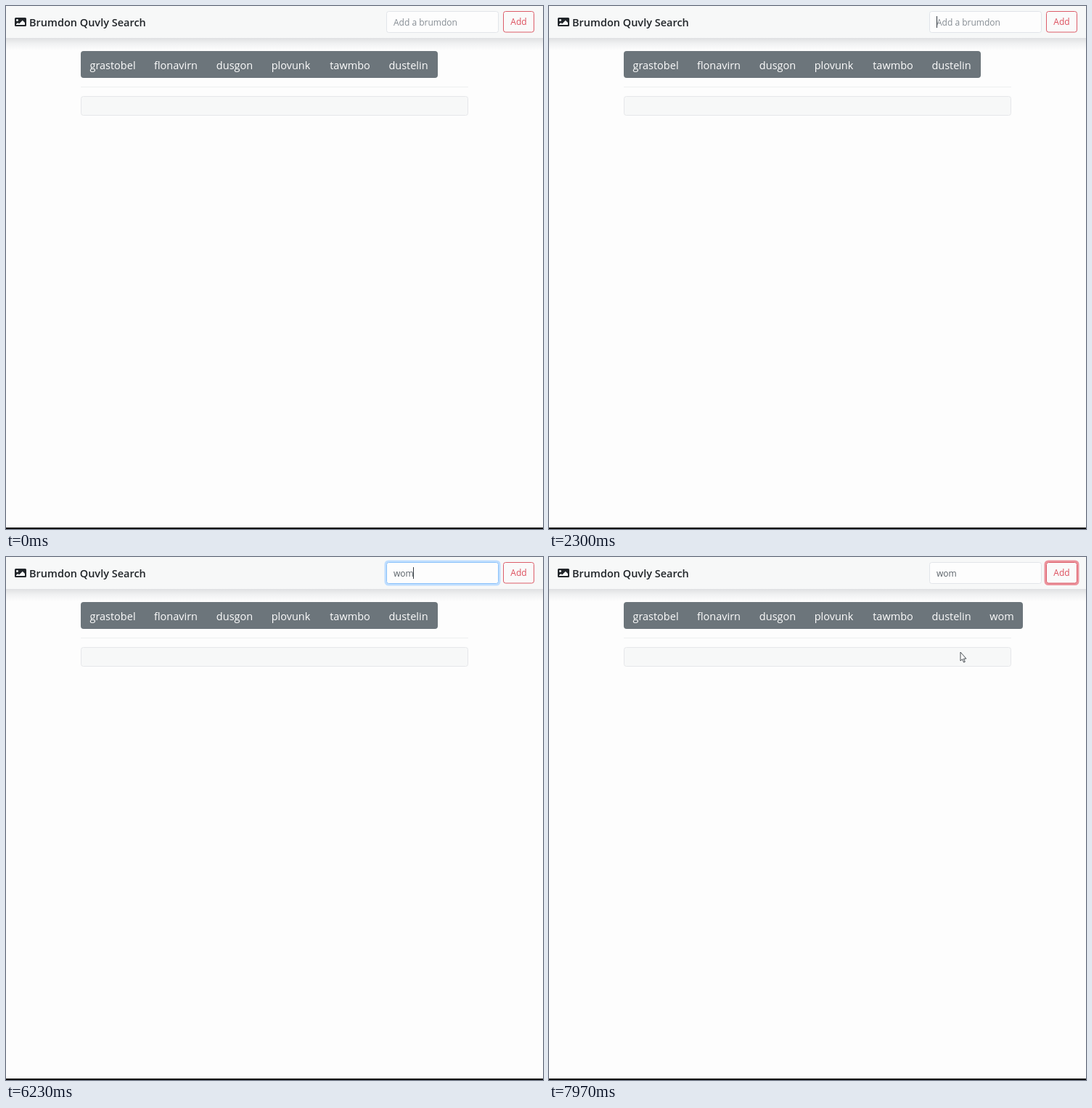
Recreate the animation shown at these times as an HTML page. Size 740 by 720 pixels, loop 8 s.

```html
<!DOCTYPE html>
<html lang="en">
<head>
<meta charset="utf-8">
<title>Search page</title>
<style>
  html, body { margin: 0; width: 100%; height: 100%; overflow: hidden; background: #fdfdfd; }
  svg { display: block; width: 100vw; height: 100vh; }
  text { font-family: "Open Sans", "Noto Sans", sans-serif; }
  .small { font-size: 12px; }
  .tags text { font-size: 14.5px; font-weight: 500; fill: #fdfdfd; text-anchor: middle; }
</style>
</head>
<body>
<svg viewBox="0 0 740 720">
  <defs>
    <linearGradient id="shade" x1="0" y1="0" x2="0" y2="1">
      <stop offset="0" stop-color="#dfe0e2"/>
      <stop offset=".45" stop-color="#f0f1f2"/>
      <stop offset="1" stop-color="#fdfdfd"/>
    </linearGradient>
  </defs>
  <rect width="740" height="720" fill="#fdfdfd"/>
  <rect y="44" width="740" height="17" fill="url(#shade)"/>
  <rect width="740" height="44" fill="#f7f8f8"/>
  <rect y="718" width="740" height="2" fill="#000"/>

  <g fill="#212529">
    <path fill-rule="evenodd" d="M13.5 16h13a1.5 1.5 0 0 1 1.5 1.5v9a1.5 1.5 0 0 1-1.5 1.5h-13a1.5 1.5 0 0 1-1.5-1.5v-9a1.5 1.5 0 0 1 1.5-1.5z
      M15.5 18a1.5 1.5 0 1 0 .01 0z M14 26h12v-3l-3.2-3.2-4.8 4.7-1.6-1.6L14 25z"/>
    <text x="32" y="27.5" font-size="14.5" font-weight="600">Brumdon Quvly Search</text>
  </g>

  <rect id="glow" x="523" y="6" width="157" height="32" rx="4" fill="none" stroke="#bfdeff" stroke-width="3"/>
  <rect id="field" x="524.5" y="7.5" width="154" height="29" rx="3" fill="#fdfdfd"/>
  <text id="entry" class="small" x="534" y="27"></text>
  <rect id="caret" y="14" width="1" height="16" fill="#343a40"/>

  <rect id="ring" x="684" y="6" width="45" height="31.5" rx="4" fill="none" stroke="#ec949d" stroke-width="3"/>
  <rect id="add" x="685.5" y="7.5" width="42" height="28.5" rx="3" stroke="#dc5d69"/>
  <text id="addText" class="small" x="706.5" y="26" text-anchor="middle">Add</text>

  <g class="tags">
    <rect id="bar" x="103" y="62" height="37" rx="4" fill="#6c757b"/>
    <g id="tags"></g>
  </g>
  <path d="M103 111.5H637" stroke="#eeeff0"/>
  <rect x="103.5" y="124.5" width="533" height="26" rx="3" fill="#f7f8f8" stroke="#e6e7ea"/>

  <g id="cursor" stroke="#343a40" stroke-width=".9" stroke-linejoin="round" fill="#fdfdfd">
    <path id="arrow" d="M0 0V12L2.7 9.6 4.5 14 6.3 13.2 4.5 9H8z"/>
    <path id="hand" d="M-1.3 1.2Q0-.8 1.3 1.2V6L3.5 6.2 6 6.8Q8 7.2 8 9V11.5Q8 14 6.5 16H-.5L-4.3 10.5Q-4 8.3-1.3 10z"/>
  </g>
</svg>
<script>
const LOOP = 8000;
const WORD = "wom";
const NAMES = ["grastobel", "flonavirn", "dusgon", "plovunk", "tawmbo", "dustelin", WORD];
const CENTERS = [147, 234, 315, 392.5, 474, 554.5, 624];
const KEYS = [4530, 4670, 4870];
const CARET = [[2270, 2800], [3330, 3870], [4370, 5400], [5930, 6460]];
const CARET_X = [534, 543.5, 551, 561];
const ROUTE = [[6170, 660, 29], [6300, 690, 26], [6400, 720, 22], [6570, 702, 24],
               [7570, 702, 24], [7670, 638, 71], [7970, 567, 131]];

const $ = id => document.getElementById(id);
const set = (id, attrs) => {
  for (const k in attrs) $(id).setAttribute(k, attrs[k]);
};
const show = (id, on) => set(id, { visibility: on ? "visible" : "hidden" });
const ramp = (t, start, length) => Math.min(1, Math.max(0, (t - start) / length));
const ease = p => p * p * (3 - 2 * p);
const fade = (t, start) => ease(ramp(t, start, 150));
const mix = (a, b, p) => `rgb(${a.map((v, i) => Math.round(v + (b[i] - v) * p))})`;

const tags = NAMES.map((name, i) => {
  const el = document.createElementNS("http://www.w3.org/2000/svg", "text");
  el.setAttribute("x", CENTERS[i]);
  el.setAttribute("y", 87);
  el.textContent = name;
  return $("tags").appendChild(el);
});

function pointer(t) {
  const i = ROUTE.findIndex((p, n) => n && t <= p[0]);
  if (i < 0) return ROUTE[ROUTE.length - 1].slice(1);
  const [t0, x0, y0] = ROUTE[i - 1], [t1, x1, y1] = ROUTE[i];
  let p = ramp(t, t0, t1 - t0);
  if (i === ROUTE.length - 1) p = 1 - (1 - p) ** 2;
  return [x0 + (x1 - x0) * p, y0 + (y1 - y0) * p];
}

function draw(t) {
  const focus = fade(t, 2290) - fade(t, 6820);
  const hover = fade(t, 6290) - fade(t, 7595);
  const added = t >= 6900;
  const typed = KEYS.filter(k => t >= k).length;

  set("glow", { opacity: focus });
  set("field", { stroke: mix([226, 229, 233], [140, 194, 250], focus) });
  $("entry").textContent = typed ? WORD.slice(0, typed) : "Add a brumdon";
  set("entry", { fill: typed ? "#5a6168" : "#858c93" });
  set("caret", { x: CARET_X[typed] });
  show("caret", CARET.some(([a, b]) => t >= a && t < b));

  set("ring", { opacity: fade(t, 6820) });
  set("add", { fill: mix([250, 250, 250], [220, 53, 69], hover) });
  set("addText", { fill: mix([221, 78, 92], [253, 250, 250], hover) });

  set("bar", { width: added ? 550 : 492 });
  tags[6].setAttribute("visibility", added ? "visible" : "hidden");

  const [x, y] = pointer(t);
  const onAdd = x > 685 && x < 728 && y > 7 && y < 37;
  const onBar = x < 653 && y > 62 && y < 99;
  const seen = t >= 6170 && (x > 681 || y > 40);
  set("cursor", { transform: `translate(${x} ${y})` });
  show("hand", seen && (onAdd || onBar));
  show("arrow", seen && !onAdd && !onBar);
}

const start = performance.now();
function tick(now) {
  draw(Math.max(0, now - start) % LOOP);
  requestAnimationFrame(tick);
}
draw(0);
requestAnimationFrame(tick);
</script>
</body>
</html>
```
